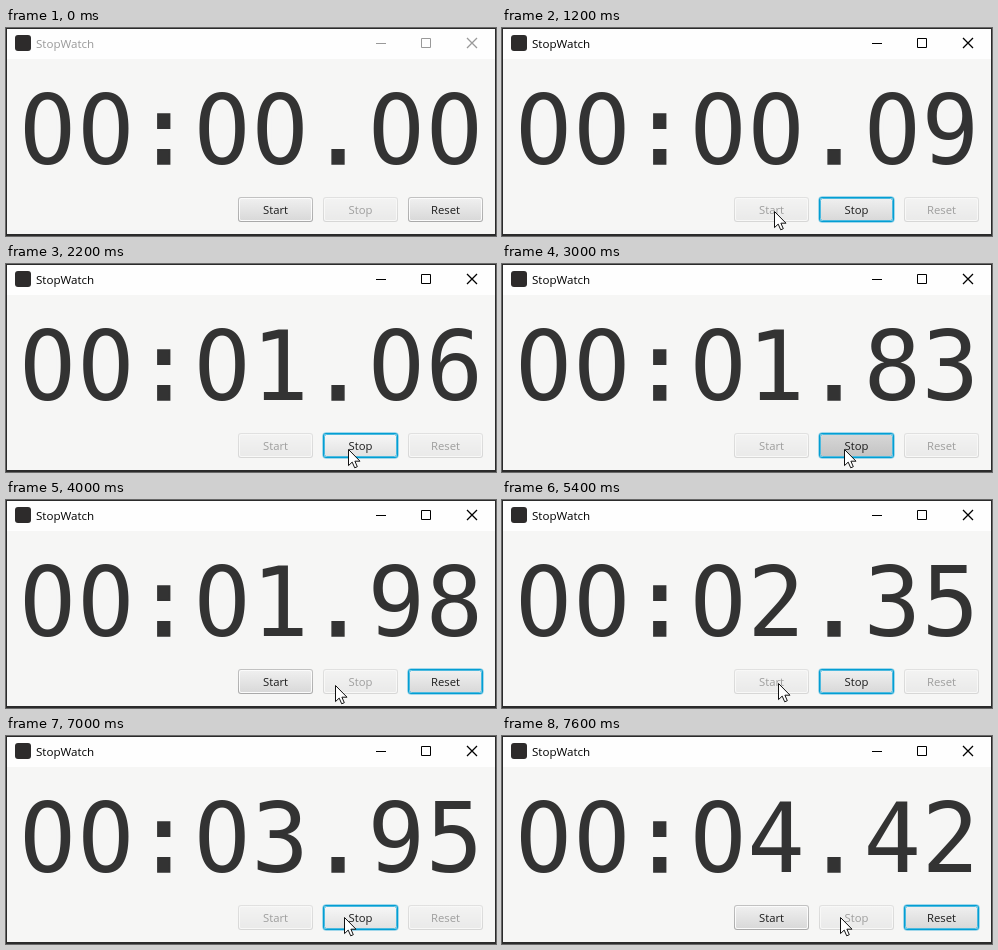
An HTML page that plays this animation: 490 px wide and 208 px high, repeating every 8 s.

```html
<!DOCTYPE html>
<html>
<head>
<meta charset="utf-8">
<style>
  html, body { margin: 0; width: 100%; height: 100%; overflow: hidden; background: #f6f6f5; }
  svg { display: block; }
  text { font-family: "Open Sans", sans-serif; fill: #1c1c1c; }
  #digits text { font: 95.8px "DejaVu Sans Mono", monospace; text-anchor: middle; fill: #333; }
  #digits .dot { stroke: #333; stroke-width: 1.5; }
  .button text { font-size: 11.3px; text-anchor: middle; }
  .ring { fill: none; stroke: #039ed3; stroke-opacity: .35; }
  .button .ring, .button .glow { visibility: hidden; }
  .focus .ring, .focus .glow { visibility: visible; }
  .edge { fill: url(#edge); }
  .face { fill: url(#face); }
  .focus .edge { fill: #039ed3; }
  .hover .face { fill: url(#hover); }
  .armed .face { fill: url(#armed); }
  .off { opacity: .4; }
</style>
</head>
<body>
<svg width="490" height="208" viewBox="0 0 490 208">
  <defs id="defs"></defs>
  <rect width="490" height="208" fill="#f6f6f5"/>
  <rect width="490" height="31" fill="#fefefe"/>
  <path d="M0 .5H490M.5 0V207M489.5 0V207" fill="none" stroke="#2b2b2b"/>
  <rect y="206" width="490" height="2" fill="#2b2b2b"/>
  <rect x="9" y="7" width="16" height="16" rx="3" fill="#2d2b2b"/>
  <text id="title" x="30" y="20" font-size="11.6">StopWatch</text>
  <g id="controls" fill="none">
    <path d="M370 15.5H380M415.5 10.5H424.5V19.5H415.5Z"/>
    <path d="M461 10L471 20M471 10L461 20" stroke-width="1.3"/>
  </g>
  <g id="digits"></g>
  <g id="buttons"></g>
  <path id="cursor" d="M.5 .5V16.6L4.2 13.1L6.7 18.8L9.3 17.7L6.9 12.2H12Z" fill="#fff" stroke="#111"/>
</svg>
<script>
const LOOP = 8000, STEP = 200;
const $ = id => document.getElementById(id);

// time, hundredths of a second
const clockKeys = [[1100, 0], [1200, 9], [2200, 106], [3150, 198],
  [5030, 198], [5400, 235], [6200, 315], [7470, 442]];
// time, x, y
const cursorKeys = [[400, 300, 214], [1000, 272, 183], [1400, 272, 183], [2000, 342, 185],
  [3800, 342, 185], [4000, 329, 185], [4600, 276, 183], [6400, 276, 183], [7000, 338, 181]];

function sample(keys, t) {
  const i = keys.findIndex(k => k[0] > t);
  if (i < 0) return keys[keys.length - 1].slice(1);
  if (i === 0) return keys[0].slice(1);
  const a = keys[i - 1], b = keys[i], p = (t - a[0]) / (b[0] - a[0]);
  return a.slice(1).map((v, j) => v + (b[j + 1] - v) * p);
}

const gradient = (id, top, bottom) =>
  `<linearGradient id="${id}" x2="0" y2="1"><stop stop-color="${top}"/><stop offset="1" stop-color="${bottom}"/></linearGradient>`;
$('defs').innerHTML = gradient('edge', '#c2c2c2', '#a9a9a9') + gradient('face', '#efefef', '#d9d9d9')
  + gradient('hover', '#f6f6f6', '#e2e2e2') + gradient('armed', '#d6d6d6', '#c4c4c4');

// the plain zero hides the dot inside the monospaced glyph
$('digits').innerHTML = [...'00:00.00'].map((c, i) => {
  const x = 41.7 + i * 58.1;
  return c === '0'
    ? `<text x="${x}" y="136"></text><rect x="${x - 9}" y="84" width="18" height="34" fill="#f6f6f5"/>`
    : `<text class="dot" x="${x}" y="135.6"></text>`;
}).join('');
const cells = [...$('digits').querySelectorAll('text')];

const lefts = [232, 317, 402];
$('buttons').innerHTML = ['Start', 'Stop', 'Reset'].map((label, i) =>
  `<g class="button" transform="translate(${lefts[i]} 169)">
    <rect class="ring" x="-.5" y="-.5" width="76" height="26" rx="3.5"/>
    <rect class="edge" width="75" height="25" rx="3"/>
    <rect x="1" y="1" width="73" height="23" rx="2" fill="#fbfbfb"/>
    <rect class="face" x="2" y="2" width="71" height="21" rx="1.5"/>
    <rect class="glow" x="1.5" y="1.5" width="72" height="22" rx="2" fill="none" stroke="#039ed3" stroke-opacity=".7"/>
    <text x="37.5" y="17">${label}</text>
  </g>`).join('');
const buttons = [...$('buttons').children];

function draw(t) {
  const active = t >= 1000;
  const running = t >= 1200 && t < 3200 || t >= 5200 && t < 7600;
  const armed = { 1000: 0, 3000: 1, 5000: 0, 7400: 1 }[t] ?? -1;
  const focus = !active ? -1 : armed >= 0 ? armed : running ? 1 : 2;
  const [x, y] = sample(cursorKeys, t).map(Math.round);

  $('controls').setAttribute('stroke', active ? '#000' : '#999');
  $('title').style.fill = active ? '#000' : '#999';

  const n = Math.floor(sample(clockKeys, t)[0] + 1e-6);
  const pad = v => String(v).padStart(2, '0');
  const time = `${pad(Math.floor(n / 6000))}:${pad(Math.floor(n / 100) % 60)}.${pad(n % 100)}`;
  cells.forEach((cell, i) => {
    cell.textContent = time[i];
    const cover = cell.nextSibling;
    if (cover?.tagName === 'rect') cover.style.display = time[i] === '0' ? '' : 'none';
  });

  buttons.forEach((b, i) => {
    const off = running === (i !== 1);
    const over = x >= lefts[i] && x < lefts[i] + 75 && y >= 169 && y < 194;
    b.setAttribute('class', ['button', off && 'off', focus === i && 'focus',
      over && !off && 'hover', armed === i && 'armed'].filter(Boolean).join(' '));
  });

  $('cursor').setAttribute('transform', `translate(${x} ${y})`);
  $('cursor').style.display = t < 600 ? 'none' : '';
}

const start = performance.now();
function tick() {
  const t = (performance.now() - start) % LOOP;
  draw(Math.floor(t / STEP) * STEP);
  requestAnimationFrame(tick);
}
tick();
</script>
</body>
</html>
```
